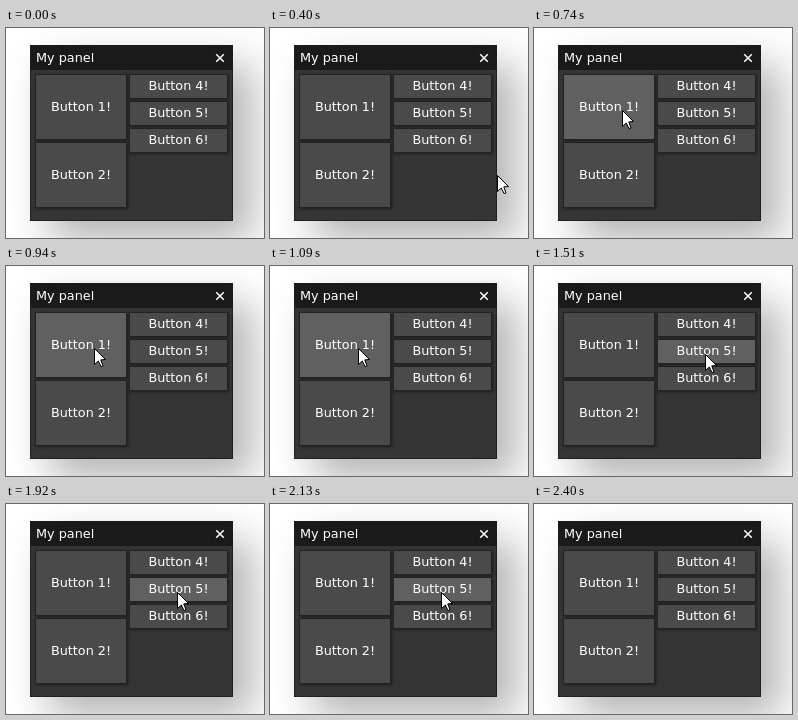
An HTML page for the animation above (2.86 s loop, 258 by 210 pixels).

```html
<!DOCTYPE html>
<html lang="en">
<head>
<meta charset="utf-8">
<title>Panel with buttons</title>
<style>
html, body { margin: 0; width: 100%; height: 100%; overflow: hidden; background: #fff; }
body { position: relative; font: 12.8px/15px "DejaVu Sans", Verdana, sans-serif; color: #fff; cursor: default; }
div, svg { position: absolute; box-sizing: border-box; }
.panel {
  left: 24px; top: 17px; width: 203px; height: 176px;
  background: #353535; border: 1px solid #202020;
  box-shadow: 20px 20px 40px rgba(0, 0, 0, .3);
}
.bar { left: 24px; top: 17px; width: 203px; height: 25px; background: #1a1a1a; }
.title { left: 30px; top: 22px; white-space: pre; }
.button {
  border: 1px solid #222; background: #4a4a4a; text-align: center; white-space: pre;
  box-shadow: 1px 1px 3px rgba(0, 0, 0, .45);
}
.close { left: 209px; top: 25px; }
#pointer { left: 0; top: 0; overflow: visible; }
</style>
</head>
<body>
<div class="panel"></div>
<div class="bar"></div>
<div class="title">My panel</div>
<svg class="close" width="10" height="10"><path d="M1.2 1.2 8.8 8.8M8.8 1.2 1.2 8.8" stroke="#fff" stroke-width="1.5"/></svg>
<svg id="pointer" width="12" height="19">
  <path d="M.5 .5V16.5L4.3 13 7 18.5 9 18 6.8 11.9 11.5 11.5Z" fill="#fff" stroke="#000" stroke-linejoin="round"/>
</svg>
<script>
const LOOP = 2860;
const SHOW = 400, HIDE = 2400;
const pointer = document.getElementById('pointer');

function addButton(n, x, y, w, h) {
  const el = document.createElement('div');
  el.className = 'button';
  el.textContent = `Button ${n}!`;
  const pad = Math.floor((h - 17) / 2);
  el.style.cssText = `left:${x}px;top:${y}px;width:${w}px;height:${h}px;padding-top:${pad - (h < 30 ? 1 : 0)}px`;
  document.body.insertBefore(el, pointer);
  return el;
}

const [first] = [0, 1].map(i => addButton(i + 1, 29, 46 + 68 * i, 92, 66));
const [, fifth] = [0, 1, 2].map(i => addButton(i + 4, 123, 46 + 27 * i, 99, 25));

// Progress from 0 to 1 in n equal jumps
const stepped = (t, from, to, n) => {
  const u = Math.floor((t - from) / (to - from) * n + 1e-6) / n;
  return Math.min(1, Math.max(0, u));
};
const smooth = u => u * u * (3 - 2 * u);
const mix = (a, b, u) => a + (b - a) * u;

function paint(el, level) {
  const v = Math.round(mix(74, 96, level));
  el.style.backgroundColor = `rgb(${v},${v},${v})`;
}

function draw(t) {
  const shown = t >= SHOW && t < HIDE;
  const enter = smooth(stepped(t, SHOW, 740, 5));
  const cross = smooth(stepped(t, 1020, 1510, 7) ** 2);
  const x = mix(mix(227, 88, enter), 171, cross);
  const y = mix(mix(147, 82, enter), 88, cross ** 2);
  pointer.style.visibility = shown ? 'visible' : 'hidden';
  pointer.style.transform = `translate(${Math.round(x)}px,${Math.round(y)}px)`;

  // Hover passes from the first button to the fifth
  const swap = stepped(t, 1300, 1510, 3);
  paint(first, stepped(t, 540, 740, 3) * (1 - swap));
  paint(fifth, shown ? swap : 0);
}

const start = performance.now();
function tick() {
  draw((performance.now() - start) % LOOP);
  requestAnimationFrame(tick);
}
tick();
</script>
</body>
</html>
```
